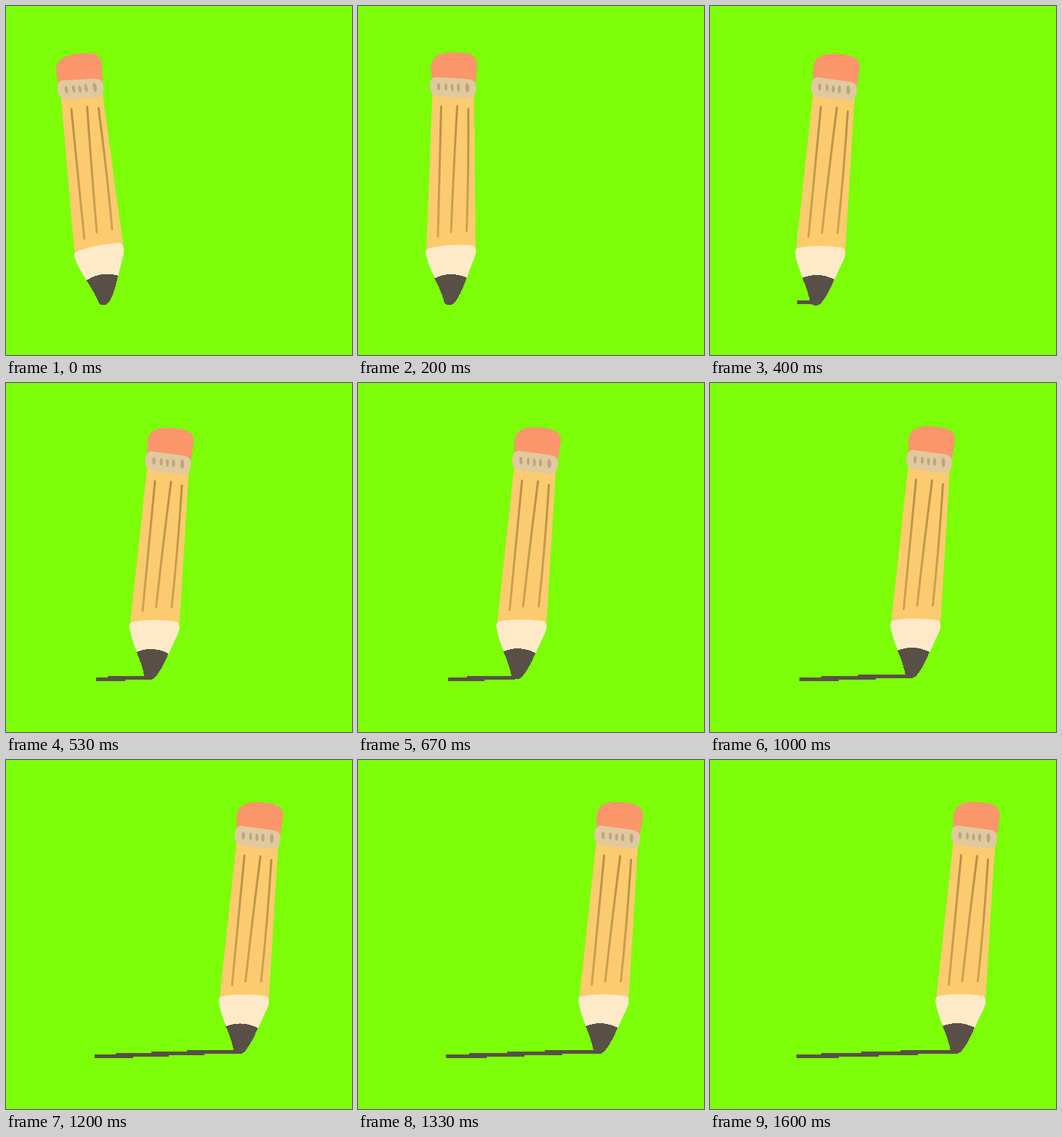
These frames come from a looping animation (476 by 480 pixels, 1.79 s). An HTML page:

```html
<!DOCTYPE html>
<html lang="en">
<head>
<meta charset="utf-8">
<title>Pencil drawing a line</title>
<style>
  html, body { margin: 0; width: 100%; height: 100%; overflow: hidden; background: #7dff08; }
  svg { display: block; width: 476px; height: 480px; }
  .lead { fill: #585046; shape-rendering: crispEdges; }
  .grooves { fill: none; stroke: url(#fade); stroke-width: 3; stroke-linecap: round; }
  .slots { fill: #bda582; }
</style>
</head>
<body>
<svg viewBox="0 0 476 480">
  <linearGradient id="fade" gradientUnits="userSpaceOnUse" x1="0" y1="-272" x2="0" y2="-96">
    <stop offset="0" stop-color="#b98f48"/>
    <stop offset="1" stop-color="#cda252"/>
  </linearGradient>
  <path id="line" class="lead"/>
  <!-- The pencil is drawn around its tip at 0,0 -->
  <g id="pencil">
    <path fill="#fccb6e" d="M-5 -294 L52 -287 L39 -74 L-29 -74 Z"/>
    <path class="grooves" d="M5.5 -273 Q-3 -186 -11.5 -95 M27.5 -272 Q17 -190 7 -100 M42.5 -267 Q37 -180 28.5 -100"/>
    <path fill="#fc966b" d="M-5 -308 L-5 -327 Q-4 -340 7 -344 Q20 -349 44 -344 Q58 -342 59 -328 L55 -302 Z"/>
    <path fill="#e1c99e" d="M1 -314 L45 -308 Q56 -306 55 -296 Q54 -282 44 -282 L3 -287 Q-8 -289 -8 -300 Q-8 -314 1 -314 Z"/>
    <g class="slots">
      <ellipse cx="4" cy="-300.5" rx="2.2" ry="5"/>
      <ellipse cx="14" cy="-299.5" rx="2" ry="5"/>
      <ellipse cx="22.5" cy="-298" rx="2" ry="5"/>
      <ellipse cx="31" cy="-297.5" rx="2.2" ry="5.5"/>
      <ellipse cx="43" cy="-296.5" rx="2.7" ry="6.5"/>
    </g>
    <path fill="#fee9c8" d="M-30 -73 Q-30 -79 -23 -80 Q2 -84 34 -80 Q40 -79 39 -69 Q37 -62 33 -55 L24 -35 L-19 -37 Q-27 -55 -30 -73 Z"/>
    <path class="lead" d="M-20 -38 Q2 -47 24 -36 Q17 -19 10 -9 Q4 0 -1 0 Q-7 0 -9 -4 Q-12 -20 -20 -38 Z"/>
  </g>
</svg>
<script>
  const LOOP = 1790, LAST = 24;
  const pencil = document.getElementById('pencil');
  const line = document.getElementById('line');

  // step, tip x, tip y, tilt, left end of the line
  const poses = [
    [0, 137.5, 410.8, -11.2, 120],
    [3, 128, 411, -4, 120],
    [6, 147, 412, 0, 120],
    [8, 199.5, 408, 0, 124],
    [12, 237, 407, 0, 124],
    [15, 278, 406, 0, 123],
    [18, 322.5, 404.5, 0, 122],
    [24, 340, 404, 0, 119]
  ];

  function slope(i, c) {
    if (!i || i === poses.length - 1) return 0;
    const a = poses[i - 1], b = poses[i + 1];
    return (b[c] - a[c]) / (b[0] - a[0]);
  }

  // Cubic Hermite through the poses
  function valueAt(step, c) {
    let i = 0;
    while (i < poses.length - 2 && step >= poses[i + 1][0]) i++;
    const a = poses[i], b = poses[i + 1];
    const span = b[0] - a[0], u = (step - a[0]) / span, v = 1 - u;
    return a[c] * v * v * (1 + 2 * u) + b[c] * u * u * (3 - 2 * u)
      + span * u * v * (slope(i, c) * v - slope(i + 1, c) * u);
  }

  // Overlapping slabs give the line its stair-stepped edge
  function strokePath(x0, y0, x1, y1) {
    const n = Math.max(1, Math.round((y0 - y1) / 2) + 1);
    const run = (x1 - x0) / n;
    let d = '';
    for (let i = 0; i < n; i++) {
      const left = x0 + (i ? run * i - 20 : 0);
      const right = Math.min(x1, x0 + run * (i + 1) + 4);
      const top = Math.round(y0 - 2.5 - 2 * i);
      d += `M${left} ${top}H${right}V${top + 5}H${left}Z`;
    }
    return d;
  }

  function draw(step) {
    const [x, y, tilt, left] = [1, 2, 3, 4].map(c => valueAt(step, c));
    pencil.setAttribute('transform', `translate(${x} ${y}) rotate(${tilt})`);
    line.setAttribute('d', step < 5 ? '' : strokePath(left, 407.5, x - 4, y - 2.5));
  }

  const start = performance.now();
  function tick() {
    const t = (performance.now() - start) % LOOP;
    // 15 pictures a second on a 10 ms clock
    draw(Math.min(LAST, Math.floor(Math.floor(t / 10) * 0.15 + 0.06)));
    requestAnimationFrame(tick);
  }
  tick();
</script>
</body>
</html>
```
